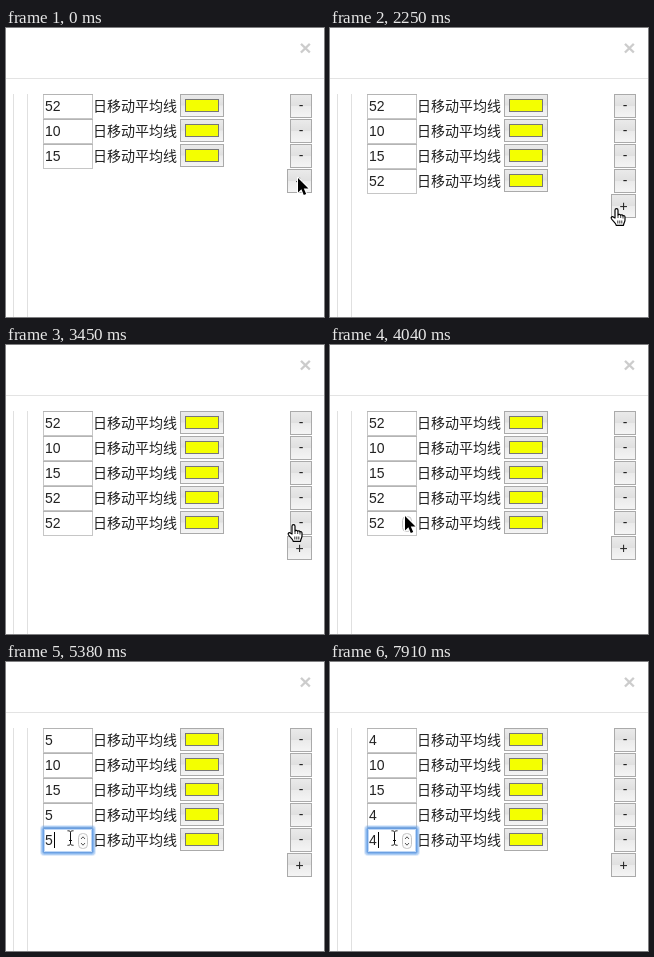
These frames come from a looping animation (318 px wide and 289 px high, 8 s). An HTML page with a canvas:

```html
<!DOCTYPE html>
<html lang="zh-CN">
<head>
<meta charset="utf-8">
<title>移动平均线</title>
<style>
  html, body { margin: 0; width: 100%; height: 100%; overflow: hidden; background: #fff; }
  canvas { display: block; }
</style>
</head>
<body>
<canvas id="stage" width="318" height="289"></canvas>
<script>
const ctx = document.getElementById('stage').getContext('2d');
const LOOP = 8000, TOP = 66, PITCH = 25;
const LATIN = '14px "Liberation Sans", Arial, sans-serif';
const CJK = '14px "Noto Sans CJK SC", "Noto Sans CJK", sans-serif';

// Each track lists [start time, ...state]; a state holds until the next one.
const rowTrack = [[0, 3], [1350, 4], [3450, 5]];
const valueTrack = [[0, '52'], [5380, '5'], [6270, ''], [6570, '4'], [7020, '42'], [7910, '4']];
const caretTrack = [[0, false], [4330, true], [4930, false], [5380, true], [5820, false],
  [6270, true], [7460, false], [7910, true]];
const cursorTrack = [
  [0, 'arrow', 291, 149], [1350, 'hand', 288, 153], [1950, 'hand', 287, 155],
  [2100, 'hand', 281, 171], [2250, 'hand', 280, 180], [2400, 'hand', 281, 179],
  [3740, 'beam', 156, 171], [3890, 'beam', 88, 171], [4040, 'arrow', 74, 170],
  [4190, 'beam', 61, 168]
];
const at = (track, t) => track.filter(key => key[0] <= t).pop().slice(1);

const shapes = {
  arrow: new Path2D('M1 1V15.5L4.4 12.3L6.8 18L9.2 17L6.8 11.4H11.5Z'),
  hand: new Path2D('M5 10V2.2a1.5 1.5 0 0 1 3 0V7c.3-1 2.4-1 2.7.3.5-.8 2.1-.5 2.3.6.7-.6 2-.2 2 1V12c0 2-1.3 3-1.5 5.3H6.3C6 15 3 13.4 1.4 10.8.6 9 2.5 8 3.6 9.2z'),
  knuckles: new Path2D('M8 7v3M10.7 7.5V10M13 8v2.5M7.8 12.5v3M9.8 12.5v3M11.8 12.5v3'),
  beam: new Path2D('M.5 .8C2 .8 3.5 1 3.5 2.5V13.5C3.5 15 2 15.3 .5 15.3M6.5 .8C5 .8 3.5 1 3.5 2.5M3.5 13.5C3.5 15 5 15.3 6.5 15.3M2 10.5H5')
};

function rect(x, y, w, h, color) {
  ctx.fillStyle = color;
  ctx.fillRect(x, y, w, h);
}

function frame(x, y, w, h, color) {
  ctx.strokeStyle = color;
  ctx.lineWidth = 1;
  ctx.strokeRect(x + .5, y + .5, w - 1, h - 1);
}

function text(str, x, y, font = LATIN, color = '#222', align = 'left') {
  ctx.font = font;
  ctx.fillStyle = color;
  ctx.textAlign = align;
  ctx.fillText(str, x, y);
}

function button(x, y, w, h, pressed) {
  const shade = ctx.createLinearGradient(0, y, 0, y + h);
  const stops = pressed
    ? ['#b4b4b4', '#adadad', '#b2b2b2', '#bebebe']
    : ['#ebebeb', '#e0e0e0', '#ebebeb', '#f5f5f5'];
  [0, .48, .52, 1].forEach((pos, i) => shade.addColorStop(pos, stops[i]));
  rect(x, y, w, h, shade);
  frame(x, y, w, h, '#aaa');
}

function focusRing(x, y, w, h) {
  ctx.lineWidth = 1;
  [[3, .2], [2, .5], [1, .72], [0, .85], [-1, .4]].forEach(([grow, alpha]) => {
    ctx.strokeStyle = `rgba(92,155,232,${alpha})`;
    ctx.beginPath();
    ctx.roundRect(x - grow + .5, y - grow + .5, w + 2 * grow - 1, h + 2 * grow - 1, Math.max(grow, 0));
    ctx.stroke();
  });
}

function spinner(x, y) {
  ctx.beginPath();
  ctx.roundRect(x + .5, y + .5, 9, 15, 4);
  ctx.fillStyle = '#fbfbfb';
  ctx.fill();
  ctx.lineWidth = 1;
  ctx.strokeStyle = '#c4c4c4';
  ctx.stroke();
  ctx.strokeStyle = '#555';
  ctx.stroke(new Path2D(`M${x + 3} ${y + 6}l2-2.2l2 2.2M${x + 3} ${y + 10}l2 2.2l2-2.2`));
}

function row(index, value) {
  const y = TOP + index * PITCH;
  rect(37, y, 50, 25, '#fff');
  frame(37, y, 50, 25, '#c6c6c6');
  rect(37, y, 50, 1, '#b4b4b4');
  text(value, 39, y + 17);
  text('日移动平均线', 87, y + 17, CJK);
  button(174, y, 44, 23);
  rect(179, y + 5, 34, 13, '#f4ff00');
  frame(179, y + 5, 34, 13, '#777');
  button(284, y, 22, 24);
  text('-', 295, y + 16, LATIN, '#222', 'center');
}

function cursor(kind, x, y) {
  ctx.save();
  ctx.translate(x, y);
  ctx.lineJoin = 'round';
  if (kind === 'arrow') {
    ctx.strokeStyle = '#fff';
    ctx.lineWidth = 2;
    ctx.stroke(shapes.arrow);
    ctx.fillStyle = '#000';
    ctx.fill(shapes.arrow);
  } else if (kind === 'hand') {
    ctx.fillStyle = '#fff';
    ctx.fill(shapes.hand);
    ctx.strokeStyle = '#000';
    ctx.lineWidth = 1.2;
    ctx.stroke(shapes.hand);
    ctx.lineWidth = .8;
    ctx.stroke(shapes.knuckles);
  } else {
    ctx.strokeStyle = '#111';
    ctx.lineWidth = 1;
    ctx.stroke(shapes.beam);
  }
  ctx.restore();
}

function draw(t) {
  const [rows] = at(rowTrack, t);
  const [value] = at(valueTrack, t);
  const [caretOn] = at(caretTrack, t);

  rect(0, 0, 318, 289, '#fff');
  text('×', 299.5, 27, 'bold 21px "Liberation Sans", Arial, sans-serif', '#ccc', 'center');
  rect(0, 50, 318, 1, '#e3e3e3');
  rect(7, TOP, 1, 223, '#e0e0e0');
  rect(21, TOP, 1, 223, '#e0e0e0');

  const values = [value, '10', '15', value, value];
  for (let i = 0; i < rows; i++) row(i, values[i]);

  const addY = TOP + rows * PITCH;
  button(281, addY, 25, 24, t >= 3300 && t < 3450);
  text('+', 293.5, addY + 17, LATIN, '#222', 'center');

  if (t >= 4330) focusRing(37, 166, 50, 25);
  if (t >= 4040) spinner(72, 171);
  if (caretOn) rect(40 + 8 * value.length, value ? 170 : 171, 1, 16, '#000');
  cursor(...at(cursorTrack, t));
}

function tick() {
  draw(performance.now() % LOOP);
  requestAnimationFrame(tick);
}
tick();
</script>
</body>
</html>
```
